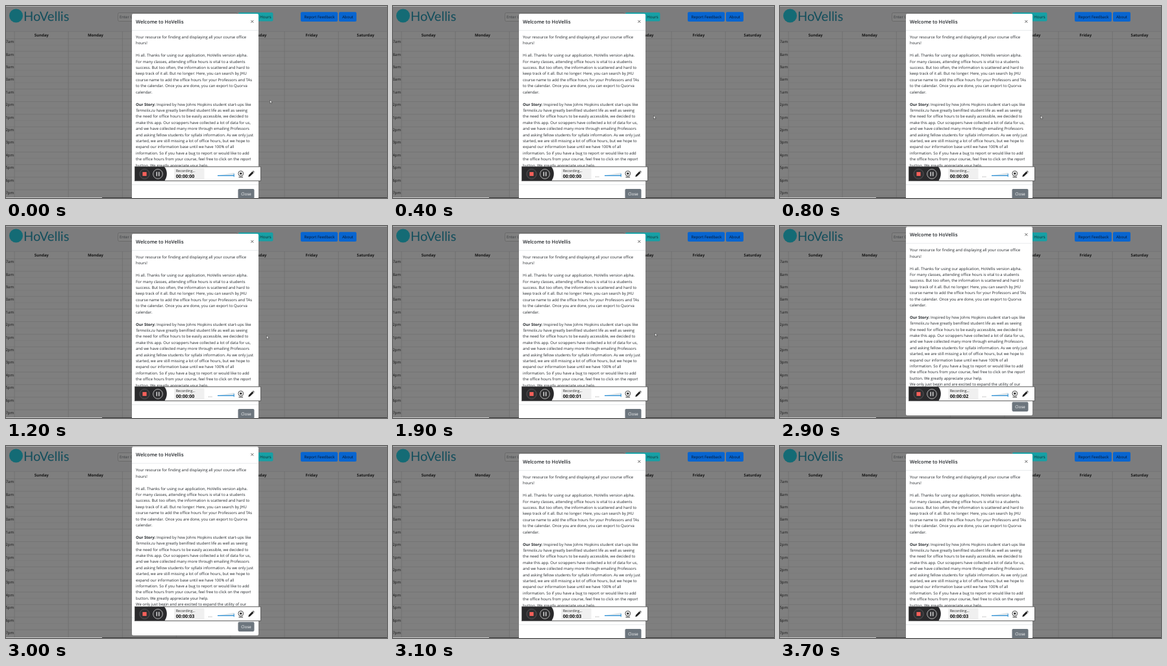
Recreate the animation shown at these times as an HTML page. Size 587 by 296 pixels, loop 3.9 s.

```html
<!DOCTYPE html>
<html lang="en">
<head>
<meta charset="utf-8">
<style>
  html, body { margin: 0; width: 100%; height: 100%; overflow: hidden; background: #7f7f7f; }
  svg { display: block; width: 587px; height: 296px; font-family: "Open Sans", "Noto Sans", sans-serif;
        font-size: 5.98px; text-rendering: geometricPrecision; }
  .mid { text-anchor: middle; }
  .end { text-anchor: end; }
  .bold { font-weight: 700; }
</style>
</head>
<body>
<svg viewBox="0 0 587 296">
  <rect width="587" height="39" fill="#7c7c7d"/>
  <rect width="587" height="1" fill="#b4b4b4"/>
  <circle cx="15.5" cy="15" r="10.5" fill="#146b75"/>
  <text x="27" y="22.5" fill="#124e5c" style="font: 20px Lato, sans-serif">HoVellis</text>

  <rect x="172.5" y="10.5" width="184" height="13" rx="2" fill="#808080" stroke="#6a6a6a"/>
  <text x="175" y="19.2" fill="#3a3d40">Enter Course</text>
  <rect x="358" y="10" width="53.5" height="13.5" rx="2" fill="#17a0a5"/>
  <text x="408.8" y="19.2" class="end" fill="#10282c" style="font-size: 6.2px">Search Hours</text>
  <rect x="454" y="9.3" width="57" height="14.7" rx="2" fill="#0865d0"/>
  <text x="483" y="18.8" class="mid" fill="#081629">Report Feedback</text>
  <rect x="513" y="9.3" width="27" height="14.7" rx="2" fill="#0865d0"/>
  <text x="526.5" y="18.8" class="mid" fill="#081629">About</text>

  <g id="calendar"></g>
  <rect y="295" width="587" height="1" fill="#3c3c3c"/>
  <rect y="295" width="148" height="1" fill="#c8c8c8"/>

  <g id="modal">
    <rect x="194" y="12" width="195" height="290.7" rx="2" fill="#fff"/>
    <text x="200" y="27.2" fill="#212529" style="font-size: 7.5px; font-weight: 600">Welcome to HoVellis</text>
    <path d="M377.4 21.9l4 4m0-4l-4 4" stroke="#555" stroke-width=".9"/>
    <path d="M194 37.5h195M194 275.5h195" stroke="#e3e6e9" stroke-width=".8"/>
    <g id="story" fill="#212529"></g>
    <rect x="357.5" y="282" width="25" height="14.6" rx="1.8" fill="#6c757d"/>
    <text x="370" y="291.5" class="mid" fill="#fff" style="font-size: 6.2px">Close</text>
  </g>

  <g id="recorder">
    <rect x="198.5" y="247.8" width="194" height="21.8" fill="#fff" stroke="#5c5c5c"/>
    <path d="M199 248H244C249 254 249 262 244.5 269.2H199Z" fill="#2a2a2c"/>
    <circle cx="213.5" cy="259" r="7.6" fill="#303032" stroke="#606062" stroke-width=".8"/>
    <rect x="210.4" y="255.9" width="6.2" height="6.2" rx=".6" fill="#f4605a"/>
    <circle cx="234" cy="259" r="7.4" fill="#303032" stroke="#c4c4c4" stroke-width=".9"/>
    <path d="M232.3 255.8v6.4m3.4-6.4v6.4" stroke="#fff" stroke-width="1.2"/>
    <rect x="259" y="250" width="46.5" height="17.5" fill="#f0f0f0"/>
    <text x="261.7" y="255.9" fill="#222" style="font-size: 5.5px">Recording...</text>
    <text id="clock" x="261.7" y="265.2" class="bold" fill="#111" style="font-size: 7.2px"></text>
    <path id="dots" d="M312 263.3h5.5" stroke="#777" stroke-width=".8" stroke-dasharray="1 1.2"/>
    <path d="M326 261.3L351.5 257V261.3Z" fill="#dfe6ea"/>
    <path d="M326 261.5h25.5" stroke="#2a8fd4" stroke-width="1.3"/>
    <path d="M351.2 258.5v5" stroke="#2a8fd4" stroke-width="1"/>
    <g fill="none" stroke="#333">
      <circle cx="361.8" cy="258.2" r="3.9" stroke-width=".9"/>
      <circle cx="361.8" cy="258.2" r="1.7" fill="#333" stroke="none"/>
      <path d="M358.5 263.8h6.6" stroke-width="1.1"/>
    </g>
    <path d="M373.3 263.4l.8-2.9 5.4-5.4 2.1 2.1-5.4 5.4ZM380.1 254.5l.7-.7 2.1 2.1-.7.7Z" fill="#222"/>
  </g>

  <path id="arrow" d="M0 0V4.9L1.2 3.9L2 5.7L2.9 5.3L2.1 3.6H3.6Z" fill="#fff" stroke="#222" stroke-width=".5"/>
  <path id="beam" d="M-1.2 -3H1.2M0 -3V3M-1.2 3H1.2" fill="none" stroke="#444" stroke-width=".6"/>
</svg>
<script>
const $ = id => document.getElementById(id);
const text = (x, y, content, cls = "") => `<text x="${x}" y="${y}" class="${cls}">${content}</text>`;
const line = (d, color) => `<path d="${d}" stroke="${color}" stroke-width=".8"/>`;

const days = ["Sunday", "Monday", "Tuesday", "Wednesday", "Thursday", "Friday", "Saturday"];
let grid = line("M0 39.5H587", "#747474");
for (let i = 0; i < 26; i++) {
  const y = 50.5 + i * 9.7;
  grid += line(`M${i % 2 ? 13 : 0} ${y}H587`, i % 2 ? "#797979" : "#717171");
  if (i % 2 === 0) {
    const hour = 7 + i / 2;
    grid += text(12, y + 6.6, ((hour - 1) % 12 + 1) + (hour < 12 ? "am" : "pm"), "end");
  }
}
days.forEach((day, i) => {
  grid += line(`M${13 + i * 83.2} 39V295`, "#707070") + text(54.8 + i * 83.2, 47, day, "mid bold");
});
$("calendar").innerHTML = `<g fill="#151515">${grid}</g>`;

const story = `Your resource for finding and displaying all your course office
hours!

Hi all. Thanks for using our application, HoVellis version alpha.
For many classes, attending office hours is vital to a students
success. But too often, the information is scattered and hard to
keep track of it all. But no longer: Here, you can search by JHU
course name to add the office hours for your Professors and TAs
to the calendar. Once you are done, you can export to Quorva
calendar.

<tspan class="bold">Our Story:</tspan> Inspired by how Johns Hopkins student start-ups like
<tspan font-style="italic">Termolix.zu</tspan> have greatly benifited student life as well as seeing
the need for office hours to be easily accessible, we decided to
make this app. Our scrappers have collected a lot of data for us,
and we have collected many more through emailing Professors
and asking fellow students for syllabi information. As we only just
started, we are still missing a lot of office hours, but we hope to
expand our information base until we have 100% of all
information. So if you have a bug to report or would like to add
the office hours from your course, feel free to click on the <tspan font-style="italic">report</tspan>
button. We greatly appreciate your help.
We only just begin and are excited to expand the utility of our`;
$("story").innerHTML = story.split("\n").map((s, i) => text(200, 50 + i * 9.41, s)).join("");

// Pointer stops: time, x, y
const stops = [[0, 406.5, 145], [400, 401.5, 169], [1300, 401.5, 169], [1900, 403.5, 165],
               [2100, 403.5, 165], [2800, 310.5, 118]];

function pointerAt(t) {
  const next = stops.findIndex(s => s[0] > t);
  if (next < 0) return stops.at(-1).slice(1);
  const [t0, x0, y0] = stops[next - 1], [t1, x1, y1] = stops[next];
  const p = (t - t0) / (t1 - t0), e = p * p * (3 - 2 * p);
  return [x0 + (x1 - x0) * e, y0 + (y1 - y0) * e];
}

function draw(now) {
  const t = Math.floor(now % 3900 / 100) * 100;
  const seconds = [1300, 2100, 3000].filter(s => t >= s).length;
  $("clock").textContent = "00:00:0" + seconds;
  $("dots").style.opacity = t >= 100 ? 1 : 0;
  $("modal").setAttribute("transform", `translate(0 ${t >= 2900 && t < 3100 ? -10.7 : 0})`);

  const [x, y] = pointerAt(t);
  const overText = x < 389;
  for (const [id, shown] of [["arrow", !overText], ["beam", overText && t < 2900]]) {
    $(id).setAttribute("transform", `translate(${x} ${y})`);
    $(id).style.display = shown ? "" : "none";
  }
}

const start = performance.now();
function tick() {
  draw(performance.now() - start);
  requestAnimationFrame(tick);
}
tick();
</script>
</body>
</html>
```
